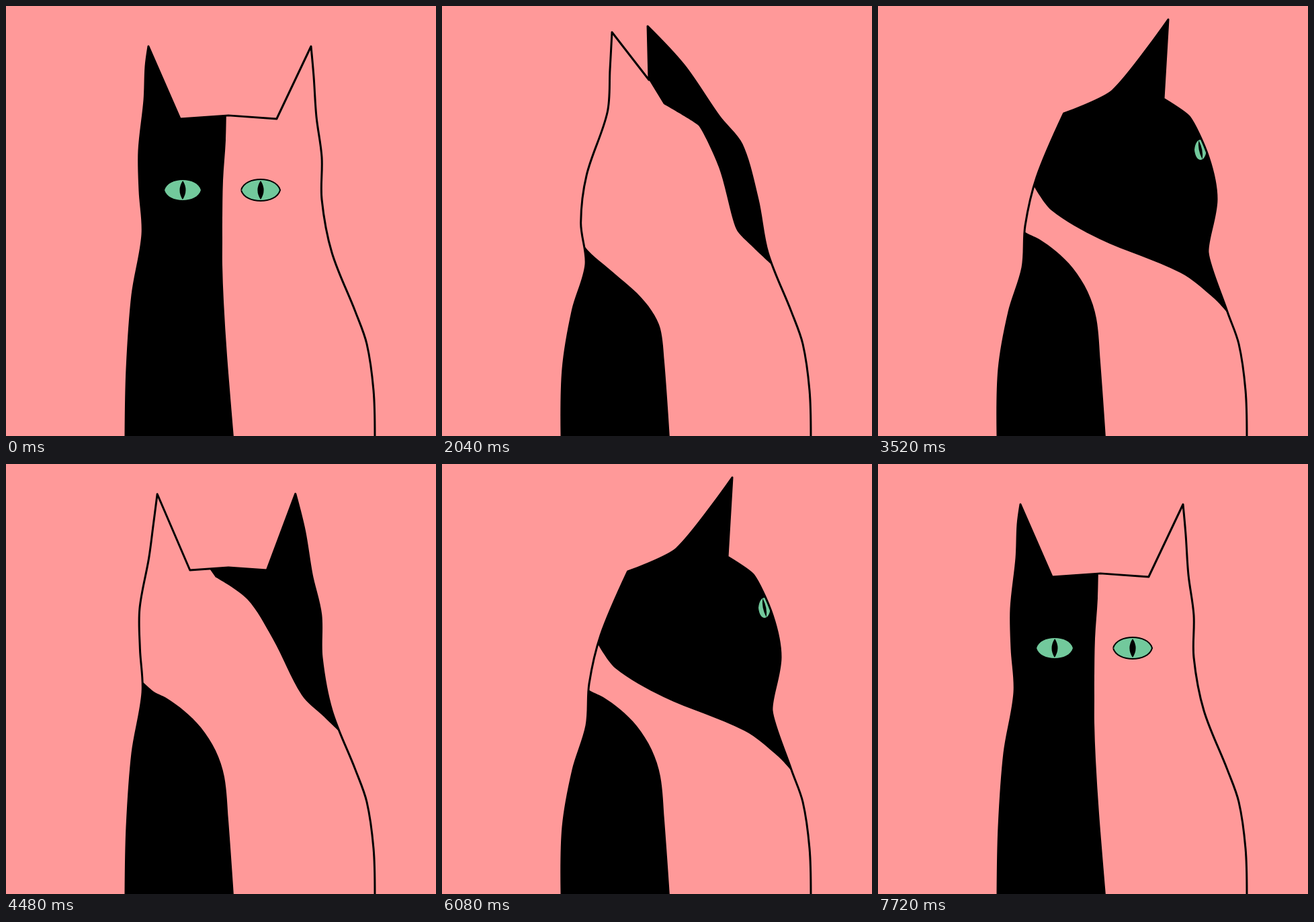
An HTML page with a canvas that plays this animation: 640x640 px, repeating every 7.8 s.

```html
<!DOCTYPE html>
<html lang="en">
<head>
<meta charset="utf-8">
<title>Cat turning its head</title>
<style>
  html, body { margin: 0; height: 100%; overflow: hidden; background: #ff9999; }
  canvas { display: block; width: 100vw; height: 100vh; }
</style>
</head>
<body>
<canvas id="stage" width="640" height="640"></canvas>
<script>
const ctx = document.getElementById('stage').getContext('2d');
const PINK = '#ff9999', GREEN = '#72c99c', BLACK = '#000';

const clamp = v => Math.min(1, Math.max(0, v));
const points = text => text.split(' ').map(p => p.split(',').map(Number));
const mix = (a, b, k) =>
  a.map(([x, y], i) => [x + (b[i][0] - x) * k, y + (b[i][1] - y) * k]);

// Ears and eyes by degrees of turn: left tip, left edge, crown, right edge,
// right tip, then x and half width of each eye (negative while out of sight).
const FRONT = '212,60 208,90 331,168 458,105 454,60 263,27 379,28';
const poses = Object.entries({
  0: FRONT,
  29: '230,45 228,90 335,159 430,95 408,36 254,27 371,28',
  107: '253,39 250,95 308,110 360,88 306,30 190,-20 190,-20',
  180: '224,45 218,90 332,160 448,100 436,45 510,-60 510,-60',
  270: '432,20 349,126 432,20 425,138 432,20 480,9 510,-12',
  285: '345,19 316,72 366,138 432,100 407,20 393,22 453,14',
  309: '301,25 277,95 366,143 455,95 452,26 350,27 452,26',
  360: FRONT
}).map(([angle, text]) => ({ angle: +angle, pts: points(text) }));

function poseAt(angle) {
  const i = Math.max(1, poses.findIndex(p => p.angle >= angle));
  const a = poses[i - 1], b = poses[i];
  return mix(a.pts, b.pts, (angle - a.angle) / (b.angle - a.angle));
}

// Seams; the last point of each leads off the cat.
const chestStraight = points('329,520 324,440 322,385 322,350 322,320 323,260 327,200 328,150 328,0');
const chestWrapped = points('331,530 325,465 312,425 290,390 265,365 240,347 217,335 170,290 100,0');
const backUpright = points('494,388 464,360 438,332 412,240 382,178 330,146 308,110');

// Smooth line through the points, left crisp where it turns sharply.
function curve(path, pts) {
  const dirs = pts.map((p, i) => {
    const a = pts[i - 1], b = pts[i + 1];
    if (!a || !b) return [0, 0];
    const ux = p[0] - a[0], uy = p[1] - a[1], vx = b[0] - p[0], vy = b[1] - p[1];
    const cos = (ux * vx + uy * vy) / (Math.hypot(ux, uy) * Math.hypot(vx, vy) || 1);
    const size = clamp((cos - 0.8) / 0.13) / 3 / (Math.hypot(ux + vx, uy + vy) || 1);
    return [(ux + vx) * size, (uy + vy) * size];
  });
  path.lineTo(...pts[0]);
  for (let i = 1; i < pts.length; i++) {
    const [x0, y0] = pts[i - 1], [x1, y1] = pts[i];
    const len = Math.hypot(x1 - x0, y1 - y0);
    path.bezierCurveTo(
      x0 + dirs[i - 1][0] * len, y0 + dirs[i - 1][1] * len,
      x1 - dirs[i][0] * len, y1 - dirs[i][1] * len, x1, y1);
  }
}

function region(color, seam, corners) {
  const path = new Path2D();
  curve(path, seam.slice(0, -1));
  [seam[seam.length - 1], ...corners].forEach(p => path.lineTo(...p));
  ctx.fillStyle = color;
  ctx.fill(path);
}

function rightOf(color, seam) {
  const exit = seam[seam.length - 1];
  region(color, seam, [[exit[0] - 8, 0], [2500, 0], [2500, seam[0][1]]]);
}

function eye([x, rx], y, rimmed) {
  if (rx < 2) return;
  const tilt = Math.sign(x - 320) * 4 * (1 - rx / 28), w = 2.5 + rx * 0.24;
  const shape = new Path2D();
  shape.moveTo(-rx, 0);
  shape.bezierCurveTo(-rx * 0.8, -20, rx * 0.8, -20, rx, 0);
  shape.bezierCurveTo(rx * 0.8, 20, -rx * 0.8, 20, -rx, 0);
  ctx.save();
  ctx.translate(x, y);
  ctx.lineWidth = 4;
  if (rimmed) ctx.stroke(shape);
  ctx.fillStyle = GREEN;
  ctx.fill(shape);
  ctx.fillStyle = BLACK;
  ctx.beginPath();
  ctx.moveTo(-tilt, -14);
  ctx.quadraticCurveTo(w, 0, tilt, 14);
  ctx.quadraticCurveTo(-w, 0, -tilt, -14);
  ctx.fill();
  ctx.restore();
}

function draw(angle) {
  const sin = Math.sin(angle * Math.PI / 180);
  const lay = Math.max(0, Math.cos(angle * Math.PI / 180));
  const right = Math.max(0, -sin), left = Math.max(0, sin), side = sin * sin;
  const [tipL, edgeL, crown, edgeR, tipR, darkEye, lightEye] = poseAt(angle);
  const slip = (seam, limit) =>
    seam.map(([x, y]) => [x + 6 * Math.max(0, limit - angle), y]);

  const outline = new Path2D();
  outline.moveTo(178, 660);
  curve(outline, [
    [178, 640], [180, 540],
    [188 + 7 * side, 430 + 25 * side],
    [203 + 12 * side, 340 + 49 * side],
    [199 + 20 * right + 8 * left, 275 + 52 * side],
    [198 + 38 * right + 18 * left, 215 + 40 * side],
    [206 + (edgeL[0] - 208) / 2 + 20 * left, 140 + 20 * side],
    edgeL, tipL
  ]);
  const gap = Math.max(0, 0.4 * (tipR[0] - tipL[0]) - 25);
  outline.lineTo(crown[0] - gap, crown[1]);
  outline.lineTo(crown[0], crown[1] - gap / 14);
  outline.lineTo(crown[0] + gap, crown[1]);
  curve(outline, [
    tipR, edgeR,
    [462 + (edgeR[0] - 458) / 2 + 18 * right, 165],
    [470 + 22 * right - 25 * left, 225 - 20 * left],
    [470 + 34 * right, 288],
    [485 + 6 * right, 367],
    [520, 455], [537, 503], [547, 572], [549, 640]
  ]);
  outline.lineTo(549, 660);

  const wrap = clamp(angle / 107);
  const wrapped = wrap * wrap * (3 - 2 * wrap);
  const chestSeam = mix(chestStraight, chestWrapped, wrapped).map(([x, y], i) =>
    [x, y + 42 * left * wrapped * Math.sin(Math.PI * i / 8)]);

  const backLaid = [
    [523 + 60 * lay * lay, 460 + 270 * lay * lay],
    [500, 435 + 100 * lay * lay],
    [450, 397 + 48 * lay],
    [330, 347 + 30 * lay],
    [258 - 5 * lay, 304 + 40 * lay],
    [232 - 30 * lay, 268 + 54 * lay],
    [100, 100]
  ];
  const backSeam = slip(mix(backUpright, backLaid, clamp((angle - 107) / 163) ** 2), 107);

  const faceSeam = slip([
    [530 - 24 * right, 490 - 84 * right],
    [420 + 48 * right, 410 - 20 * right],
    [340 + 97 * right, 325 + 12 * right],
    [323 + 118 * right, 270 + 12 * right],
    [327 + 99 * right, 200],
    crown, [crown[0], 0]
  ], 285);

  ctx.fillStyle = PINK;
  ctx.fillRect(0, 0, 640, 640);
  ctx.save();
  ctx.clip(outline);
  rightOf(BLACK, backSeam);
  rightOf(PINK, faceSeam);
  region(BLACK, [[339, 640], ...chestSeam], [[0, 0], [0, 640]]);
  eye(darkEye, 274 - 60 * side, false);
  eye(lightEye, 274 - 60 * side, true);
  ctx.restore();

  ctx.strokeStyle = BLACK;
  ctx.lineWidth = 3;
  ctx.lineJoin = 'round';
  ctx.stroke(outline);
}

// A full turn, a short rest, then the neck unwinds again.
const LOOP = 7800, STEP = 40, TURN = 960, UNWIND = 1120;
const starts = [440, 3040, 5600];

function headAngle(t) {
  const start = starts.filter(s => s <= t).pop();
  if (start === undefined) return 0;
  const u = t - start;
  if (u < UNWIND) return 360 * (1 - Math.max(0, 1 - u / TURN) ** 2);
  return 360 * Math.max(0, 1 - (u - UNWIND) / TURN) ** 1.75;
}

function tick() {
  const t = performance.now() % LOOP;
  draw(headAngle(Math.floor(t / STEP) * STEP));
  requestAnimationFrame(tick);
}
tick();
</script>
</body>
</html>
```
